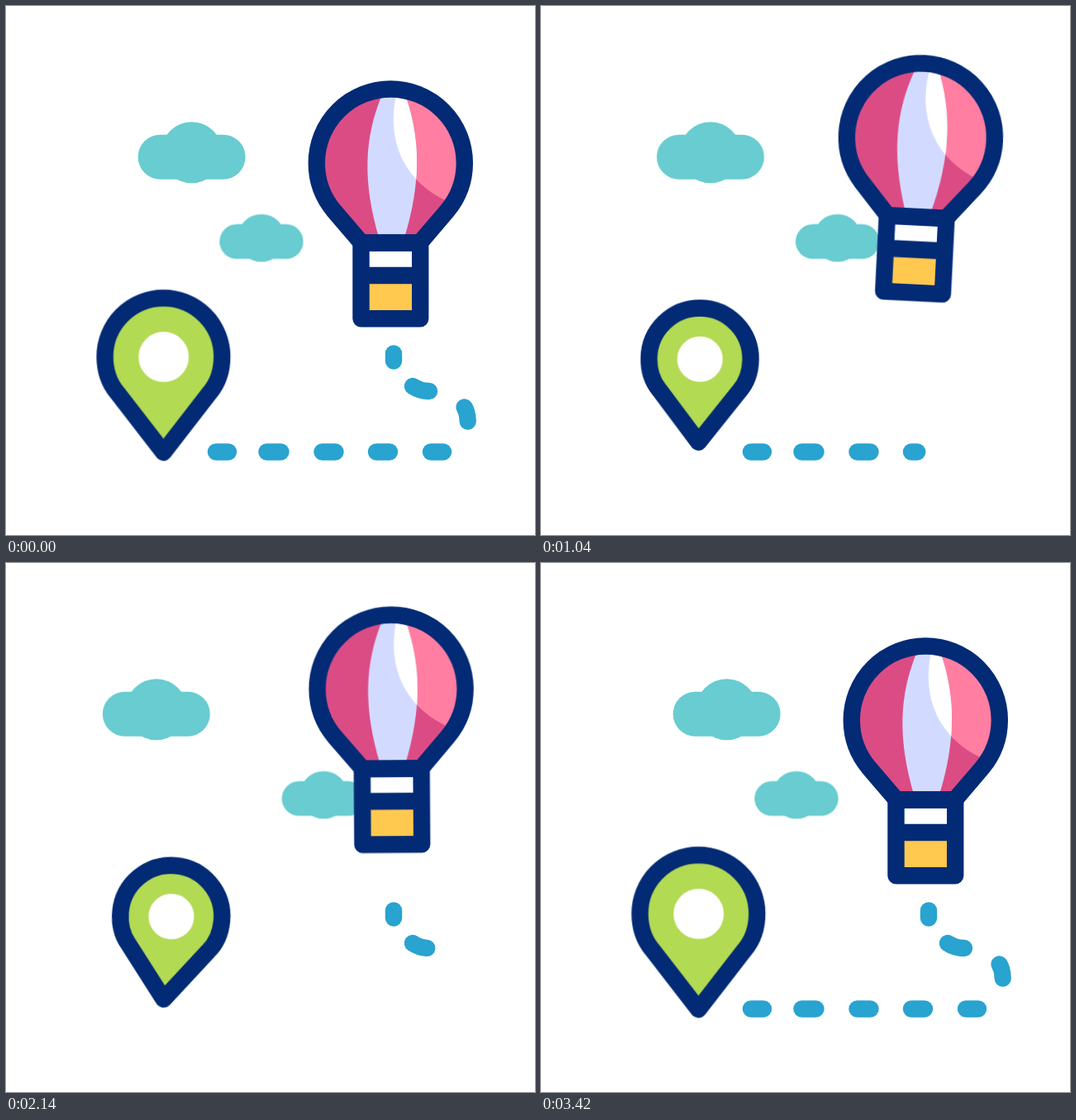
Write an HTML page without scripts that moves like this. It is 640 by 640 pixels and loops after 3460 ms.

```html
<!DOCTYPE html>
<html lang="en">
<head>
<meta charset="utf-8">
<title>Balloon trip</title>
<style>
  @property --erased { syntax: "<length>"; inherits: true; initial-value: 0px; }
  @property --drawn { syntax: "<length>"; inherits: true; initial-value: 130px; }

  html, body { margin: 0; width: 100%; height: 100%; overflow: hidden; background: #fff; }
  svg { display: block; width: 640px; height: 640px; }

  .cloud-far, .cloud-near, .bob, .tilt, .sway, .grow, .trail {
    animation: 3460ms cubic-bezier(.37, 0, .63, 1) infinite;
  }
  .outline { fill: none; stroke: #032a75; stroke-width: 20.4; stroke-linejoin: round; stroke-linecap: round; }

  /* Clouds drift in opposite directions */
  .cloud-far { animation-name: drift-left; }
  .cloud-near { animation-name: drift-right; }
  @keyframes drift-left {
    0%, 9.83%, 98.84%, 100% { transform: none; }
    54.34% { transform: translateX(-46px); }
  }
  @keyframes drift-right {
    0%, 4.62%, 92.49%, 100% { transform: none; }
    51.73% { transform: translateX(88px); }
  }

  /* Balloon */
  .bob { animation-name: bob; }
  .tilt { animation-name: tilt; transform-origin: 465.3px 72px; }
  @keyframes bob {
    0%, 4.62%, 42.77%, 47.54%, 86.13%, 100% { transform: none; }
    22.4%, 67.05% { transform: translateY(-45px); }
  }
  @keyframes tilt {
    0%, 9.83%, 98.84%, 100% { transform: rotate(0deg); }
    31.79%, 75.14% { transform: rotate(2.9deg); }
    50.58% { transform: rotate(-2.9deg); }
  }

  /* Pin: the shape scales, its line weight does not */
  .sway { animation-name: sway; transform-origin: 190.5px 530px; }
  .grow { animation-name: grow; transform-origin: 190.5px 446px; }
  .grow * { vector-effect: non-scaling-stroke; }
  @keyframes grow {
    0%, 4.62%, 98.27%, 100% { transform: scale(1.152); }
    13.87% { transform: scale(1.32); }
    30.35%, 88.15% { transform: scale(1); }
  }
  @keyframes sway {
    0%, 4.62%, 98.27%, 100% { transform: rotate(0deg); }
    11.5% { transform: rotate(-5deg); }
    19.65% { transform: rotate(1.2deg); }
    30.06% { transform: rotate(.9deg); }
    50.29% { transform: rotate(.3deg); }
    61.85% { transform: rotate(5.2deg); }
    69.94% { transform: rotate(0deg); }
    78.03% { transform: rotate(4.5deg); }
    87% { transform: rotate(0deg); }
  }

  /* Trail: erased dash by dash, then drawn again from the balloon */
  .trail { animation-name: trail; fill: none; stroke: #29a3cf; stroke-width: 20.4; stroke-linecap: round; }
  .trail path {
    stroke-dasharray: var(--len) 99px;
    stroke-dashoffset: calc(
      clamp(0px, var(--at) + var(--len) - var(--drawn), var(--len) + 1px)
      - clamp(0px, var(--erased) - var(--at), var(--len) + 1px));
  }
  @keyframes trail {
    0%, 4.62% { --erased: 0px; --drawn: 130px; }
    51.73% { --erased: 127.2px; --drawn: 130px; }
    51.74% { --erased: 0px; --drawn: 0px; animation-timing-function: cubic-bezier(.3, .1, .65, .95); }
    92.49%, 100% { --erased: 0px; --drawn: 130px; }
  }
</style>
</head>
<body>
<svg viewBox="0 0 640 640">
  <defs>
    <g id="cloud" fill="#68ccd0">
      <rect x="-65" y="-54" width="130" height="54" rx="27"/>
      <circle cy="-32.5" r="37"/>
    </g>
    <path id="envelope" d="M430 286.5L397 248C383.5 232 375.8 212 375.8 190A89.5 89.5 0 0 1 554.8 190C554.8 212 547 232 533.6 248L500.7 286.5Z"/>
    <path id="stripe" d="M456 105C432 160 432 215 451 280H482C502 215 502 160 482 105Z"/>
    <path id="shine" d="M474 100C460 150 472 208 535 237L570 190L540 100Z"/>
    <clipPath id="in-envelope"><use href="#envelope"/></clipPath>
    <clipPath id="in-stripe"><use href="#stripe"/></clipPath>
  </defs>

  <g class="cloud-far"><use href="#cloud" transform="translate(224.7 209.7)"/></g>
  <g class="cloud-near"><use href="#cloud" transform="translate(309 306) scale(.78)"/></g>

  <g class="trail">
    <path pathLength="9" style="--at:0px;--len:9px" d="M469 420.5V429.5"/>
    <path pathLength="21" style="--at:9px;--len:21px" d="M492 460C498 464 505 466 512 466"/>
    <path pathLength="18" style="--at:30px;--len:18px" d="M554.5 485.5C557.5 490 558.5 496 558.7 502.5"/>
    <path pathLength="15" style="--at:48px;--len:15px" d="M529 539.5H514"/>
    <path pathLength="16" style="--at:63px;--len:16px" d="M464 539.5H448"/>
    <path pathLength="16" style="--at:79px;--len:16px" d="M398.5 539.5H382.5"/>
    <path pathLength="17" style="--at:95px;--len:17px" d="M332.5 539.5H315.5"/>
    <path pathLength="15" style="--at:112px;--len:15px" d="M269 539.5H254"/>
  </g>

  <g class="bob"><g class="tilt">
    <g clip-path="url(#in-envelope)">
      <use href="#envelope" fill="#db4c85"/>
      <use href="#shine" fill="#ff7ea1"/>
      <use href="#stripe" fill="#d2dbff"/>
      <g clip-path="url(#in-stripe)"><use href="#shine" fill="#fff"/></g>
    </g>
    <path fill="#fff" d="M430 286.5H501V326H430Z"/>
    <path fill="#ffc94f" d="M430 326H501V378H430Z"/>
    <use href="#envelope" class="outline"/>
    <path class="outline" d="M429.5 286.5H501.2V378.3H429.5ZM429.5 326H501.2"/>
  </g></g>

  <g class="sway"><g class="grow">
    <path class="outline" style="fill:#b2da52" d="M190.5 527.7L142 465C133.5 455 129 441.5 129 427A61.5 61.5 0 0 1 252 427C252 441.5 247.5 455 239 465Z"/>
    <circle cx="190.7" cy="427.3" r="19" fill="#fff" stroke="#fff" stroke-width="17"/>
  </g></g>
</svg>
</body>
</html>
```
